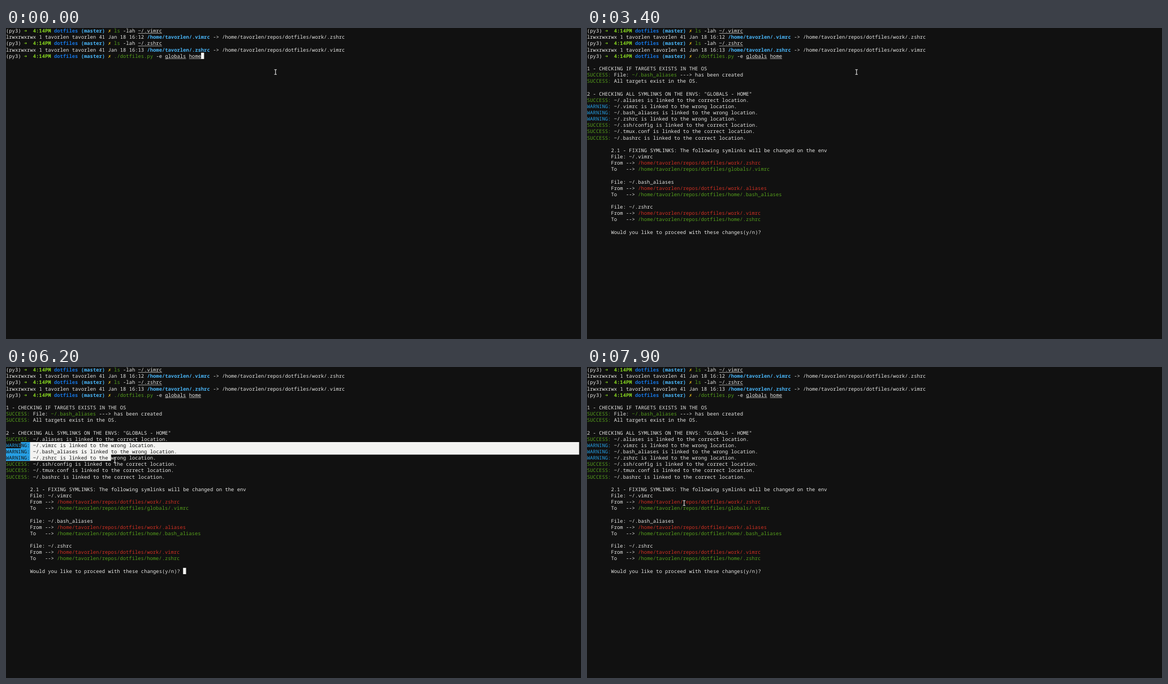
Write an HTML page that moves like this. It is 1017 by 551 pixels and loops after 8 s.

```html
<!DOCTYPE html>
<html lang="en">
<head>
<meta charset="utf-8">
<title>Terminal</title>
<style>
html, body { margin: 0; width: 100%; height: 100%; overflow: hidden; background: #111; }
svg { display: block; width: 1017px; height: 551px; }
text { font: 8.847px "Noto Sans Mono", "DejaVu Sans Mono", monospace; fill: #e8e8e6; white-space: pre; text-rendering: geometricPrecision; }
.g { fill: #56a01c; }
.r { fill: #d03022; }
.w { fill: #269fe4; }
.y { fill: #e8bd1c; }
.t, .a { fill: #86d420; font-weight: 700; }
.d { fill: #1675e0; font-weight: 700; }
.b { fill: #48b4f6; font-weight: 700; }
.a, .y { font-family: "DejaVu Sans Mono", monospace; }
.sel text { fill: #111; }
</style>
</head>
<body>
<svg viewBox="0 0 1017 551">
  <rect width="1017" height="551" fill="#111"/>
  <clipPath id="clip"><path id="area"/></clipPath>
  <g id="head"></g>
  <g id="output"></g>
  <g id="sel" class="sel" clip-path="url(#clip)"></g>
  <rect id="caret" fill="#f4f4f2"/>
  <g id="mouse" fill="none">
    <path d="M-2.2-4.2H-.6L0-3.6L.6-4.2H2.2M0-3.6V3.6M-2.2 4.2H-.6L0 3.6L.6 4.2H2.2" stroke="#111" stroke-width="2.2"/>
    <path d="M-2.2-4.2H-.6L0-3.6L.6-4.2H2.2M0-3.6V3.6M-2.2 4.2H-.6L0 3.6L.6 4.2H2.2" stroke="#e4e4e4" stroke-width="1.1"/>
  </g>
</svg>
<script>
const CW = 5.308, RH = 11.147, TOP = -0.83, COLS = 191, LOOP = 8000;
const $ = id => document.getElementById(id);
const rowY = row => TOP + row * RH;

const home = '/home/tavorlen';
const repo = home + '/repos/dotfiles';
const prompt = '(py3) {a ➜}  {t 4:14PM} {d dotfiles} {b (master)} {y ✗} ';
const listing = (time, file, dest) =>
  `lrwxrwxrwx 1 tavorlen tavorlen 41 Jan 18 ${time} {b ${home}/${file}} -> ${repo}/work/${dest}`;
const ok = text => '{g SUCCESS:} ' + text;
const good = file => ok(`~/${file} is linked to the correct location.`);
const wrong = file => `{w WARNING:} ~/${file} is linked to the wrong location.`;
const indent = ' '.repeat(8);
const change = (file, from, to) => [
  `${indent}File: ~/${file}`,
  `${indent}From --> {r ${repo}/${from}}`,
  `${indent}To   --> {g ${repo}/${to}}`,
  ''
];

const head = [
  prompt + '{g ls} -lah {u ~/.vimrc}',
  listing('16:12', '.vimrc', '.zshrc'),
  prompt + '{g ls} -lah {u ~/.zshrc}',
  listing('16:13', '.zshrc', '.vimrc'),
  prompt + '{g ./dotfiles.py} -e {u globals} {u home}'
];
const warnings = ['.vimrc', '.bash_aliases', '.zshrc'].map(wrong);
const output = [
  '1 - CHECKING IF TARGETS EXISTS IN THE OS',
  ok('File: {g ~/.bash_aliases} ---> has been created'),
  ok('All targets exist in the OS.'),
  '',
  '2 - CHECKING ALL SYMLINKS ON THE ENVS: "GLOBALS - HOME"',
  good('.aliases'),
  ...warnings,
  good('.ssh/config'),
  good('.tmux.conf'),
  good('.bashrc'),
  '',
  indent + '2.1 - FIXING SYMLINKS: The following symlinks will be changed on the env',
  ...change('.vimrc', 'work/.zshrc', 'globals/.vimrc'),
  ...change('.bash_aliases', 'work/.aliases', 'home/.bash_aliases'),
  ...change('.zshrc', 'work/.vimrc', 'home/.zshrc'),
  indent + 'Would you like to proceed with these changes(y/n)?'
];

function add(parent, tag, attrs, text = '') {
  const el = document.createElementNS('http://www.w3.org/2000/svg', tag);
  for (const key in attrs) el.setAttribute(key, attrs[key]);
  el.textContent = text;
  parent.append(el);
}

// "{c text}" gives text the class c; words sit on the cell grid.
function print(parent, lines, firstRow) {
  lines.forEach((line, i) => {
    const y = rowY(firstRow + i) + 8.9;
    let col = 0;
    for (const [plain, style = '', styled] of line.matchAll(/\{(\w) ([^}]*)\}|[^{]+/g)) {
      const run = styled || plain;
      for (const word of run.matchAll(/\S+/g))
        add(parent, 'text', { x: (col + word.index) * CW, y, class: style }, word[0]);
      if (style === 'u')
        add(parent, 'rect', { x: col * CW, y: y + 1.2, width: run.length * CW, height: 0.7, fill: '#d8d8d6' });
      col += run.length;
    }
  });
}

const block = (row, from, to, rows = 1) =>
  `M${from * CW} ${rowY(row)}H${to * CW}v${rows * RH}H${from * CW}z`;
const dragTo = col => block(12, 5, COLS) + block(13, 0, COLS) + block(14, 0, col);

print($('head'), head, 0);
print($('output'), output, 6);
add($('sel'), 'path', { d: block(12, 0, COLS, 3), fill: '#f3f3f1' });
add($('sel'), 'path', { d: block(12, 0, 8, 3), fill: '#269fe4' });
print($('sel'), warnings, 12);
$('caret').setAttribute('width', CW);
$('caret').setAttribute('height', RH);

// start, output shown, caret on, mouse x, mouse y, selection
const steps = [
  [0, 0, 1, 476.7, 78, ''],
  [800, 0, 0, 476.7, 78, ''],
  [1100, 0, 1, 476.7, 78, ''],
  [1800, 0, 0, 476.7, 78, ''],
  [2300, 0, 1, 476.7, 78, ''],
  [3400, 1, 0, 476.7, 78, ''],
  [3900, 1, 1, 476.7, 78, ''],
  [4500, 1, 0, 164, 126, ''],
  [5100, 1, 1, 46.3, 140, ''],
  [5600, 1, 0, 46.3, 140, block(12, 5, 7)],
  [6200, 1, 1, 192.5, 165, dragTo(35)],
  [6800, 1, 0, 195, 176, dragTo(36)],
  [7300, 1, 1, 147, 246, ''],
  [7900, 1, 0, 171.8, 241, '']
];

let current;
function draw() {
  const time = performance.now() % LOOP;
  const step = steps.findLast(s => s[0] <= time);
  if (step !== current) {
    current = step;
    const [, shown, caret, x, y, area] = step;
    $('output').style.display = shown ? '' : 'none';
    $('caret').style.display = caret ? '' : 'none';
    $('caret').setAttribute('x', (shown ? 59 : 65) * CW);
    $('caret').setAttribute('y', rowY(shown ? 32 : 4));
    $('mouse').setAttribute('transform', `translate(${x} ${y})`);
    $('sel').style.display = area ? '' : 'none';
    $('area').setAttribute('d', area);
  }
  requestAnimationFrame(draw);
}
draw();
</script>
</body>
</html>
```
